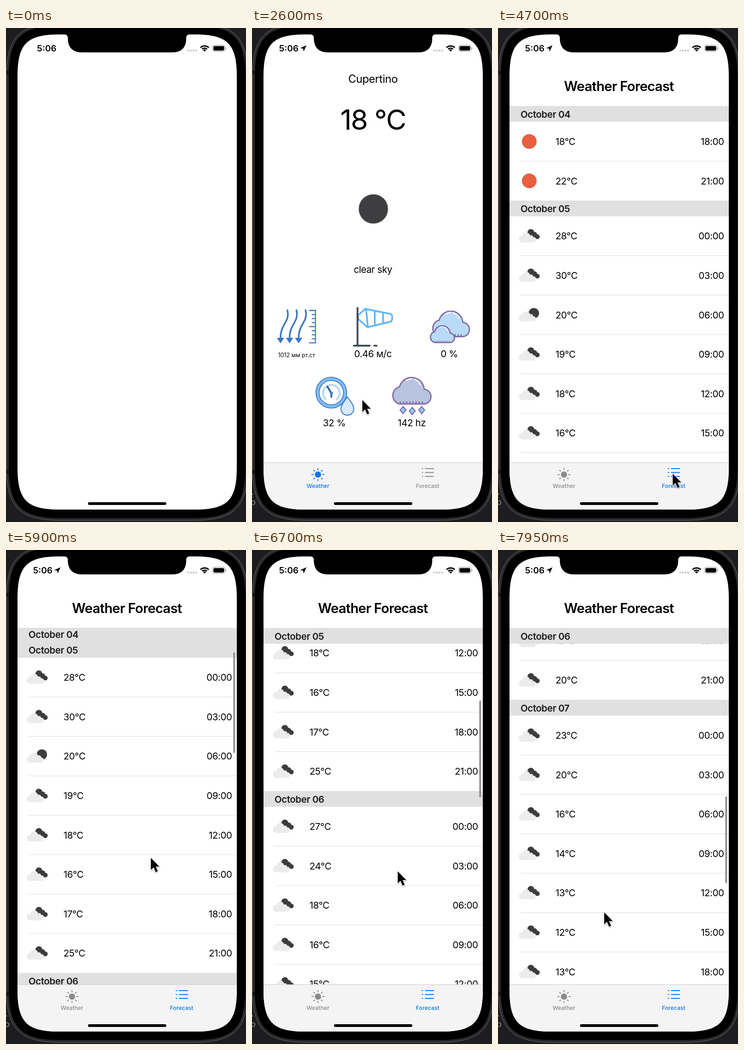
Animation, 522 px wide and 1073 px high, one loop 8 s. Source, as an HTML page:

```html
<!DOCTYPE html>
<html lang="en">
<head>
<meta charset="utf-8">
<title>Weather app</title>
<style>
  html, body { margin: 0; width: 100%; height: 100%; overflow: hidden; background: #1d1c1f; }
  svg { display: block; width: 100%; height: 100%; }
  text { font-family: Inter, "Open Sans", sans-serif; font-size: 20.5px; letter-spacing: -.02em; }
  .mid { text-anchor: middle; }
  .end { text-anchor: end; }
  .bold { font-weight: 600; }
  .tab text { font-size: 12.3px; font-weight: 500; letter-spacing: 0; fill: currentColor; }
  .line { fill: none; stroke-linecap: round; stroke-linejoin: round; }
</style>
</head>
<body>
<svg id="stage" viewBox="0 0 522 1073" preserveAspectRatio="none"></svg>
<script>
const LOOP = 8000, TOP = 169.4, BOTTOM = 944, HEADER = 34.2, ROW = 85.6;
const BLUE = '#0a77f5', GRAY = '#8b8b8b';
const SECTIONS = [
  { day: 'October 04', firstHour: 18, temps: [18, 22] },
  { day: 'October 05', firstHour: 0, temps: [28, 30, 20, 19, 18, 16, 17, 25] },
  { day: 'October 06', firstHour: 0, temps: [27, 24, 18, 16, 15, 15, 15, 20] },
  { day: 'October 07', firstHour: 0, temps: [23, 20, 16, 14, 13, 12, 13, 16] }
];

const text = (x, y, str, cls = '', attrs = '') => `<text x="${x}" y="${y}" class="${cls}" ${attrs}>${str}</text>`;
const circle = (x, y, r, attrs = '') => `<circle cx="${x}" cy="${y}" r="${r}" ${attrs}/>`;
const rect = (x, y, w, h, attrs = '') => `<rect x="${x}" y="${y}" width="${w}" height="${h}" ${attrs}/>`;
const path = (d, attrs = '') => `<path d="${d}" ${attrs}/>`;
const group = (content, attrs = '') => `<g ${attrs}>${content}</g>`;
const repeat = (n, fn) => Array.from({ length: n }, (_, i) => fn(i)).join('');

// Rounded rectangle with continuous (squircle-like) corners
function smoothRect(x0, y0, x1, y1, r, k) {
  const c = r - k;
  return `M${x0},${y0 + r} C${x0},${y0 + c} ${x0 + c},${y0} ${x0 + r},${y0} H${x1 - r}
    C${x1 - c},${y0} ${x1},${y0 + c} ${x1},${y0 + r} V${y1 - r}
    C${x1},${y1 - c} ${x1 - c},${y1} ${x1 - r},${y1} H${x0 + r}
    C${x0 + c},${y1} ${x0},${y1 - c} ${x0},${y1 - r} Z`;
}
const SCREEN = smoothRect(25, 14, 502, 1046, 92, 72);
const CLOUD = 'M18,60 H69 A16.5,16.5 0 0 0 72,27 A28,28 0 0 0 17,22 A19.5,19.5 0 0 0 18,60 Z';

function bigCloud(x, y, scale, fill) {
  const hashes = repeat(8, i => `M${19 + i * 7},55 v4 `);
  return group(
    path(CLOUD, `fill="${fill}"`) +
    path(hashes, 'class="line" stroke-width="2.5"') +
    path('M33,8 Q38,4 44,4 M50,5 Q59,8 63,17', 'class="line" stroke="#eef6ff" stroke-width="3"'),
    `transform="translate(${x} ${y}) scale(${scale})" stroke="#80629f" stroke-width="${2.6 / scale}"`);
}

function pressureIcon() {
  const arrow = i => {
    const x = 62 + i * 19.7;
    return path(`M${x + 15},613 C${x + 21},640 ${x - 1},642 ${x},676`, 'class="line" stroke-width="3.6"') +
      path(`M${x - 8},673 h16 l-8,12 Z`, 'fill="#3a78c3" stroke="none"');
  };
  const ticks = repeat(9, i => `M138,${613.5 + i * 8.8} h${i % 4 ? -8 : -14} `);
  return group(repeat(3, arrow) + path('M138,612 V685 ' + ticks, 'fill="none" stroke-width="2.3"'), 'stroke="#3a78c3"');
}

function windIcon() {
  return path('M246,610 L301,621 Q305,622 305,629 Q305,637 301,638 L251,650 L231,632 V624 Z M248,610 L252,649 M267,615 V645 M285,618 V641',
      'class="line" stroke="#5fb4f9" stroke-width="3.6"') +
    path('M229.5,608 V689 M222,690 H256 M266,690 H271', 'class="line" stroke="#434a54" stroke-width="4"');
}

function humidityIcon() {
  return group(
    circle(172.5, 792, 30, 'stroke="#4584cb" stroke-width="9"') +
    circle(172.5, 792, 30, 'stroke="#82bdf4" stroke-width="5"') +
    path('M160,806 A18,18 0 1 1 185,806', 'stroke="#b9daf8" stroke-width="4.5"') +
    path('M164,779 L172.5,793 V801', 'stroke="#35649b" stroke-width="4"') +
    circle(172.5, 793, 3.5, 'fill="#4584cb"') +
    path('M207.5,801 C213,810 221.5,818 221.5,827 A14,14 0 0 1 193.5,827 C193.5,818 202,810 207.5,801 Z',
      'fill="#d8eafb" stroke="#4584cb" stroke-width="2.2"'), 'class="line"');
}

function rainIcon() {
  const drop = (x, y) => path(`M${x},${y - 8} l6.5,8 l-6.5,8 l-6.5,-8 Z`, 'fill="#8fcbfa" stroke="#80629f" stroke-width="2"');
  return bigCloud(304, 758, .98, '#b7c3e1') + drop(328.5, 830) + drop(348.5, 832) + drop(369, 830);
}

function weatherScreen() {
  return text(263, 119, 'Cupertino', 'mid', 'style="font-size:24px"') +
    text(263, 221, '18 °C', 'mid', 'style="font-size:61px;letter-spacing:-.03em"') +
    circle(264, 393, 32, 'fill="#3e3e40" stroke="#bbb"') +
    text(263, 532, 'clear sky', 'mid') +
    pressureIcon() + windIcon() +
    bigCloud(391, 614, .94, '#b9dbf7') + bigCloud(386.5, 646, .62, '#b9dbf7') +
    humidityIcon() + rainIcon() +
    text(97, 715, '1012 мм рт.ст', 'mid', 'style="font-size:12.4px;letter-spacing:0"') +
    text(263, 715, '0.46 м/с', 'mid') + text(429, 715, '0 %', 'mid') +
    text(179, 865, '32 %', 'mid') + text(347.5, 865, '142 hz', 'mid');
}

// Small list icons, centred on y = 0
function listIcon(kind) {
  if (kind === 'sun') return circle(68, 0, 16, 'fill="#e95f40"');
  const shade = kind === 'scattered' ? circle(78, -3.5, 11.3)
    : circle(71.5, -7.5, 7.5) + circle(79.5, -3, 5.8) + circle(85.5, 1.5, 5.2);
  return group(shade, 'fill="#3d3d3f"') +
    path('M52,14 A7,7 0 0 1 53,-.5 A8.5,8.5 0 0 1 69.5,-1.5 Q76,-3 76.5,3 A5.6,5.6 0 0 1 78,14 Z',
      'fill="#ececec"');
}

function listRow(section, i) {
  const y = HEADER + (i + .5) * ROW;
  const kind = section === SECTIONS[0] ? 'sun' : section === SECTIONS[1] && i === 2 ? 'scattered' : 'broken';
  const hour = String(section.firstHour + 3 * i).padStart(2, '0');
  const isLast = i === section.temps.length - 1;
  return group(
    group(listIcon(kind), 'class="icon"') +
    text(125, 7.5, section.temps[i] + '°C') + text(491.5, 7.5, hour + ':00', 'end') +
    (isLast ? '' : rect(49, ROW / 2 - .5, 453, 1, 'fill="#dcdcdc"')), `transform="translate(0 ${y})"`);
}

function forecastScreen() {
  const rows = SECTIONS.map(s => group(repeat(s.temps.length, i => listRow(s, i)), 'class="rows"')).join('');
  const headers = SECTIONS.map(s => group(
    rect(25, 0, 477, HEADER, 'fill="#e0e0e0"') + text(49, 25.3, s.day, 'bold', 'fill="#1c1c1c"'), 'class="header"')).join('');
  return text(263, 137, 'Weather Forecast', 'mid bold', 'style="font-size:29.3px;letter-spacing:-.025em"') +
    group(rows + headers + rect(494.4, 0, 3.6, 0, 'id="bar" rx="1.8" fill="#8a8a8d"'), 'id="list" clip-path="url(#listClip)"');
}

function tabBar() {
  const rays = repeat(8, i => {
    const c = Math.cos(i * Math.PI / 4), s = Math.sin(i * Math.PI / 4);
    return `M${143.5 + 10.5 * c},${970 + 10.5 * s} L${143.5 + 13.3 * c},${970 + 13.3 * s} `;
  });
  const lines = repeat(3, i => `M370,${957 + i * 8.5} h1.5 M377,${957 + i * 8.5} h18 `);
  return rect(25, BOTTOM, 477, 102, 'fill="#f4f4f4"') + rect(25, BOTTOM - .5, 477, 1, 'fill="#c9c9c9"') +
    group(circle(143.5, 970, 6.8, 'fill="currentColor"') +
      path(rays, 'class="line" stroke="currentColor" stroke-width="2"') +
      text(143.5, 999.3, 'Weather', 'mid'), 'id="weatherTab" class="tab"') +
    group(path(lines, 'class="line" stroke="currentColor" stroke-width="1.9"') +
      text(382, 999.3, 'Forecast', 'mid'), 'id="forecastTab" class="tab"');
}

function statusBar() {
  return text(0, 51.2, '5:06', 'bold', 'id="clock" style="font-size:19px;letter-spacing:0"') +
    path('M118.5,37.5 L104.8,43.8 L111.3,44.7 L112.2,51.2 Z', 'id="arrow"') +
    repeat(4, i => circle(396.5 + i * 5.6, 49, 2.1, 'fill="#c5c5c7"')) +
    path('M423,42.6 A13.2,13.2 0 0 1 441,42.6 M426.6,46 A8,8 0 0 1 437.4,46', 'fill="none" stroke="#000" stroke-width="2.9"') +
    path('M432,51.3 L428.6,47.9 A4.9,4.9 0 0 1 435.4,47.9 Z') +
    rect(449.3, 37.3, 27, 13.6, 'rx="4" fill="none" stroke="#999" stroke-width="1.1"') +
    rect(451.2, 39.2, 23.2, 9.8, 'rx="2.4"') +
    path('M477.6,41.8 Q479.4,42.4 479.4,44.1 Q479.4,45.8 477.6,46.4 Z', 'fill="#999"');
}

const svg = document.getElementById('stage');
svg.innerHTML =
  `<defs><clipPath id="screenClip">${path(SCREEN)}</clipPath>
   <clipPath id="listClip">${rect(25, TOP, 477, BOTTOM - TOP)}</clipPath></defs>` +
  rect(0, 0, 522, 1073, 'fill="#1d1c1f"') +
  group(circle(1, 1012, 1.3) + text(-3, 1036, 'b', '', 'style="font-size:18px"'), 'id="backText" fill="#8d8d8f"') +
  path(smoothRect(.5, -10, 526, 1069.5, 120, 92), 'fill="#29292b" stroke="#6a6a6c"') +
  rect(1, 93, 5, 8, 'fill="#151517"') + rect(1, 960, 5, 8, 'fill="#151517"') +
  path(smoothRect(6, -5, 521, 1064.5, 114, 88)) +
  path(SCREEN, 'fill="#fff"') +
  group(
    group(weatherScreen(), 'id="weather"') + group(forecastScreen(), 'id="forecast"') +
    group(tabBar(), 'id="tabs"'), 'clip-path="url(#screenClip)"') +
  path('M124,12 V14 H127 Q134.5,14 134.5,22 C134.5,42 145,53 165,53 H362 C382,53 392,42 392,22 Q392,14 399,14 H402 V12 Z') +
  statusBar() +
  rect(178.3, 1030, 170.4, 6, 'rx="3"') +
  group(path('M0,0 V26 L6,20.5 L10.5,31 L15,29 L10.5,19 H18.5 Z',
    'stroke="#fff" stroke-width="2.4" paint-order="stroke" stroke-linejoin="round"'),
    'id="cursor" style="filter:drop-shadow(0 1.5px 1.5px rgba(0,0,0,.35))"');

const $ = id => document.getElementById(id);
const rowGroups = [...svg.querySelectorAll('.rows')];
const headerGroups = [...svg.querySelectorAll('.header')];
const icons = [...svg.querySelectorAll('.icon')];
const offsets = SECTIONS.map((_, i) =>
  SECTIONS.slice(0, i).reduce((sum, s) => sum + HEADER + s.temps.length * ROW, 0));

const CURSOR = [ // time, x, y
  [1000, -25, 1045], [1800, 240, 808], [3550, 240, 808], [4200, 380, 968], [5100, 380, 968],
  [5450, 330, 730], [5700, 320, 620], [6050, 312, 700], [6300, 312, 536], [6700, 317, 698],
  [7050, 316, 755], [7320, 303, 529], [7370, 303, 529], [7950, 231, 787]
];
const SCROLL = [ // time, offset, px per ms
  [5450, 0, 0], [5700, 110, .5], [6050, 195, .1], [6300, 355, .78],
  [6700, 570, .35], [7050, 655, .15], [7350, 881, 1.73], [7950, 1487.4, .52]
];

const clamp01 = v => Math.min(1, Math.max(0, v));
const smooth = v => v * v * (3 - 2 * v);
const ramp = (t, from, to) => smooth(clamp01((t - from) / (to - from)));

function segment(keys, t) {
  let i = 0;
  while (i < keys.length - 2 && t >= keys[i + 1][0]) i++;
  const [a, b] = [keys[i], keys[i + 1]];
  return { a, b, u: clamp01((t - a[0]) / (b[0] - a[0])) };
}

function cursorAt(t) {
  const { a, b, u } = segment(CURSOR, t), k = smooth(u);
  return [a[1] + (b[1] - a[1]) * k, a[2] + (b[2] - a[2]) * k];
}

// Cubic Hermite, so drags and flicks join with matching speed
function scrollAt(t) {
  const { a, b, u } = segment(SCROLL, t), d = b[0] - a[0], v = 1 - u;
  return a[1] * (1 + 2 * u) * v * v + b[1] * u * u * (3 - 2 * u) + d * u * v * (a[2] * v - b[2] * u);
}

const show = (el, on) => el.setAttribute('visibility', on ? 'visible' : 'hidden');
const moveTo = (el, x, y) => el.setAttribute('transform', `translate(${x.toFixed(2)} ${y.toFixed(2)})`);

function renderList(t) {
  const scroll = scrollAt(t);
  const tops = offsets.map(o => TOP + o - scroll);
  tops.forEach((y, i) => {
    const pushed = i + 1 < tops.length ? Math.min(TOP, tops[i + 1] - HEADER) : TOP;
    moveTo(rowGroups[i], 0, y);
    moveTo(headerGroups[i], 0, Math.max(y, pushed));
  });
  const length = 215 - (scroll - 355) * .023;
  $('bar').setAttribute('y', TOP + 3 + scroll * length / 775);
  $('bar').setAttribute('height', length);
  $('bar').setAttribute('opacity', ramp(t, 5450, 5550));
}

function render(t) {
  const loaded = t >= 1000, onForecast = t >= 4300;
  const appear = ramp(t, 950, 1200);
  $('clock').setAttribute('x', 67.3 - 8.6 * ramp(t, 450, 800));
  $('arrow').setAttribute('opacity', ramp(t, 450, 800));
  $('weather').setAttribute('opacity', loaded && !onForecast ? appear : 0);
  $('tabs').setAttribute('opacity', loaded ? appear : 0);
  show($('backText'), loaded);
  $('forecast').setAttribute('opacity', onForecast ? 1 : 0);
  $('list').setAttribute('opacity', t >= 4400 ? 1 : 0);
  icons.forEach(icon => show(icon, t >= 4450));
  $('weatherTab').style.color = onForecast ? GRAY : BLUE;
  $('forecastTab').style.color = onForecast ? BLUE : GRAY;
  renderList(t);
  show($('cursor'), loaded);
  moveTo($('cursor'), ...cursorAt(t));
}

const start = performance.now();
function tick() {
  render((performance.now() - start) % LOOP);
  requestAnimationFrame(tick);
}
tick();
</script>
</body>
</html>
```
